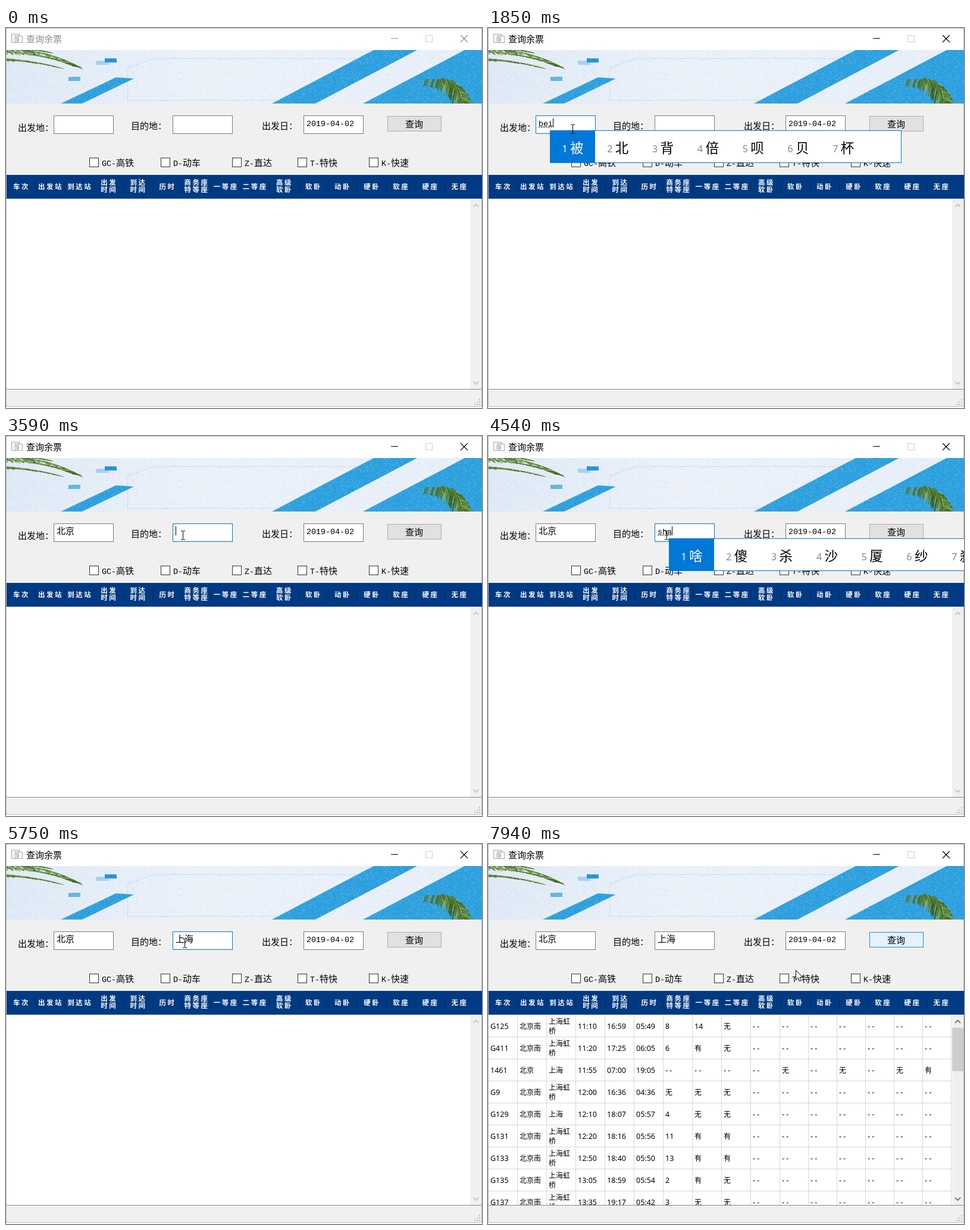
Write an HTML page with a canvas that moves like this. It is 800 by 639 pixels and loops after 8 s.

```html
<!DOCTYPE html>
<html lang="zh-CN">
<head>
<meta charset="utf-8">
<title>查询余票</title>
<style>
html, body { margin: 0; width: 100%; height: 100%; overflow: hidden; background: #fff; }
canvas { display: block; width: 800px; height: 639px; }
</style>
</head>
<body>
<canvas id="stage" width="800" height="639"></canvas>
<script>
const LOOP = 8000;
const BLUE = '#0078d7';
const CJK = '"Noto Sans CJK SC", "Noto Sans CJK", sans-serif';
const SANS = '"Noto Sans", "Open Sans", ' + CJK;
const MONO = '"Liberation Mono", monospace';
const ctx = document.getElementById('stage').getContext('2d');

const HEADERS = ['车次', '出发站', '到达站', '出发|时间', '到达|时间', '历时', '商务座|特等座', '一等座',
  '二等座', '高级|软卧', '软卧', '动卧', '硬卧', '软座', '硬座', '无座'];
const ROWS = [
  'G125 北京南 上海虹桥 11:10 16:59 05:49 8 14 无',
  'G411 北京南 上海虹桥 11:20 17:25 06:05 6 有 无',
  '1461 北京 上海 11:55 07:00 19:05 - - - - 无 - 无 - 无 有',
  'G9 北京南 上海虹桥 12:00 16:36 04:36 无 无 无',
  'G129 北京南 上海 12:10 18:07 05:57 4 无 无',
  'G131 北京南 上海虹桥 12:20 18:16 05:56 11 有 有',
  'G133 北京南 上海虹桥 12:50 18:40 05:50 13 有 有',
  'G135 北京南 上海虹桥 13:05 18:59 05:54 2 有 无',
  'G137 北京南 上海虹桥 13:35 19:17 05:42 3 无 无'
].map(row => row.split(' '));

// Each key press: time, composed text, candidates, optional fuzzy-sound hint.
const FROM_KEYS = [
  [1620, 'b', '不 吧 被 把 比 本 并'],
  [1770, 'be', '被 北 背 倍 呗 贝 杯'],
  [1850, 'bei', '被 北 背 倍 呗 贝 杯'],
  [2020, "bei'j", '北京 背景 北极 背脊 被 北 背'],
  [2100, "bei'ji", '北极 背脊 北级 被 北 背 呗'],
  [2250, "bei'jin", '被禁 北进 北金 背筋 北京(jīng) 被 呗', 'in,ing'],
  [2330, "bei'jing", '北京 背景 被 北 背 呗 贝']
];
const TO_KEYS = [
  [4290, 's', '是 说 三 四 岁 送 所'],
  [4370, 'sh', '是 上 谁 时 事 说 使'],
  [4450, 'sha', '啥 傻 杀 沙 厦 纱 刹'],
  [4610, 'shan', '山 善 闪 删 扇 衫 珊', 'an,ang'],
  [4780, 'shang', '上 商 伤 尚 赏 裳 晌'],
  [5020, "shang'h", '上海 赏花 伤害 商户 商会'],
  [5110, "shang'ha", '上海 伤害 伤寒 商行 上'],
  [5180, "shang'hai", '上海 伤害 上 商 伤']
];
const FIELDS = [
  { x: 80, focus: 765, blur: 3590, keys: FROM_KEYS, commit: 2560, value: '北京', caretOff: [[1300, 1620], [2880, 3410]] },
  { x: 280, focus: 3590, blur: 6760, keys: TO_KEYS, commit: 5260, value: '上海', caretOff: [[4140, 4290], [5750, 6280]] }
];

// Pointer moves: start, end, steps, then from / control / to points.
const MOVES = [
  [230, 990, 11, 200, 670, 165, 240, 142, 169],
  [3050, 3590, 8, 142, 169, 220, 188, 297, 166],
  [3740, 3820, 2, 297, 166, 298, 166, 300, 166],
  [6030, 6760, 11, 300, 166, 470, 398, 673, 161],
  [7860, 7940, 2, 673, 161, 595, 182, 517, 212]
];

function rect(c, x, y, w, h, fill) {
  c.fillStyle = fill;
  c.fillRect(x, y, w, h);
}

function box(x, y, w, h, fill, stroke) {
  rect(ctx, x, y, w, h, stroke);
  rect(ctx, x + 1, y + 1, w - 2, h - 2, fill);
}

function path(c, points, close) {
  c.beginPath();
  for (let i = 0; i < points.length; i += 2) c.lineTo(points[i], points[i + 1]);
  if (close) c.closePath();
}

function polygon(c, points, fill) {
  path(c, points, true);
  c.fillStyle = fill;
  c.fill();
}

function line(c, points, color, width = 1) {
  path(c, points);
  c.strokeStyle = color;
  c.lineWidth = width;
  c.stroke();
}

// Text centred vertically on cy.
function text(str, x, cy, size, color, family = SANS, weight = 400) {
  ctx.font = `${weight} ${size}px ${family}`;
  ctx.fillStyle = color;
  ctx.fillText(str, x, cy + size * 0.38);
}

// Form text: full-width glyphs 15 px apart, half-width ones 8 px.
function formText(str, x, cy, color = '#000') {
  for (const ch of str) {
    const narrow = ch < '\u0100';
    if (narrow) text(ch, x, cy, 13.33, color, MONO);
    else text(ch, x, cy, 15, color, CJK, 300);
    x += narrow ? 8 : 15;
  }
}

function randomizer(seed) {
  return () => (seed = (seed * 16807) % 2147483647) / 2147483647;
}

// Leaflets of a given length and direction along a curved stem.
function frond(c, rnd, x0, y0, cx, cy, x1, y1, length, dx, dy) {
  const greens = ['#47702a', '#6b9440', '#8fb464', '#35581f'];
  const count = 64;
  for (let i = 0; i < count; i++) {
    const u = i / (count - 1), v = 1 - u;
    const x = v * v * x0 + 2 * v * u * cx + u * u * x1;
    const y = v * v * y0 + 2 * v * u * cy + u * u * y1;
    const reach = length * (1 - u * 0.5) * (0.6 + rnd() * 0.5);
    c.strokeStyle = greens[Math.floor(rnd() * 4)];
    c.lineWidth = 0.7 + rnd() * 0.6;
    c.beginPath();
    c.moveTo(x, y);
    c.quadraticCurveTo(x + dx * reach * 0.7, y + dy * reach * 0.3, x + dx * reach, y + dy * reach);
    c.stroke();
  }
}

function makeBanner() {
  const canvas = document.createElement('canvas');
  canvas.width = 800;
  canvas.height = 127;
  const c = canvas.getContext('2d');
  const rnd = randomizer(71);
  const sky = c.createLinearGradient(0, 37, 800, 127);
  sky.addColorStop(0, '#e0eaf6');
  sky.addColorStop(0.4, '#edf2fa');
  sky.addColorStop(1, '#e8f0f9');
  c.beginPath();
  c.rect(1, 37, 799, 90);
  c.clip();
  rect(c, 0, 37, 800, 90, sky);
  line(c, [455, 121.5, 204.5, 121.5, 204.5, 66.5, 250, 51.5, 590, 51.5], '#c9dced');
  const blue = '#2a9fde';
  polygon(c, [92, 127, 185, 83, 215, 85, 128, 127], blue);
  polygon(c, [447, 127, 618, 37, 691, 37, 520, 127], blue);
  polygon(c, [600, 127, 771, 37, 800, 37, 800, 127], blue);
  rect(c, 151, 55, 21, 7, '#a9d0ec');
  rect(c, 166, 51, 20, 7, '#2095d5');
  rect(c, 105, 82, 20, 7, '#60b5e2');
  for (let i = 0; i < 22000; i++) {
    const shade = rnd() < 0.5 ? 'rgba(255,255,255,.2)' : 'rgba(110,160,215,.12)';
    rect(c, Math.floor(rnd() * 800), 37 + Math.floor(rnd() * 90), 1, 1, shade);
  }
  frond(c, rnd, -30, 32, 60, 32, 116, 64, 34, 0.9, 0.4);
  frond(c, rnd, -30, 36, 60, 42, 112, 64, 32, 0.95, 0.2);
  frond(c, rnd, -30, 50, 30, 52, 84, 66, 30, 0.95, 0.2);
  frond(c, rnd, -20, 30, 30, 32, 66, 40, 30, 0.95, 0.2);
  frond(c, rnd, 776, 127, 768, 84, 704, 86, 30, -0.25, 0.8);
  frond(c, rnd, 770, 127, 762, 84, 726, 86, 38, -0.3, 0.9);
  frond(c, rnd, 768, 122, 758, 86, 730, 84, 32, 0.35, 0.8);
  frond(c, rnd, 770, 127, 764, 98, 748, 88, 24, 0.75, 0.5);
  return canvas;
}
const banner = makeBanner();

function drawWindow(active) {
  rect(ctx, 0, 0, 800, 639, '#fff');
  box(0, 0, 800, 637, '#f0f0f0', '#b9b9b9');
  rect(ctx, 1, 1, 798, 36, '#fff');
  box(9, 10, 14, 15, '#f4f6f8', '#a3abb2');
  box(15, 13, 13, 12, '#fff', '#98a2aa');
  rect(ctx, 17, 15, 5, 8, '#b9cbd8');
  const ink = active ? '#000' : '#8c8c8c';
  formText('查询余票', 34, 18.5, ink);
  rect(ctx, 647, 17, 12, 1, ink);
  box(705, 12, 12, 12, '#fff', '#cfcfcf');
  line(ctx, [764, 12, 776, 24], ink, 1.1);
  line(ctx, [776, 12, 764, 24], ink, 1.1);
  ctx.drawImage(banner, 0, 0);
}

function drawForm(t) {
  formText('出发地：', 20, 167);
  formText('目的地：', 210, 164);
  formText('出发日：', 430, 164);
  box(500, 147, 101, 31, '#fff', '#7a7a7a');
  formText('2019-04-02', 505, 160);

  const [mx, my] = pointer(t);
  const over = mx >= 641 && mx < 732 && my >= 148 && my < 174;
  let skin = ['#e1e1e1', '#adadad'];
  if (t >= 6760 && t < 7540) skin = ['#d5e9f7', '#1a67b0'];
  else if (over || t >= 7540) skin = ['#e5f1fb', '#2a86d4'];
  box(641, 148, 91, 26, ...skin);
  formText('查询', 671, 161);

  [[140, 'GC-高铁'], [260, 'D-动车'], [380, 'Z-直达'], [490, 'T-特快'], [610, 'K-快速']].forEach(([x, label]) => {
    box(x, 218, 16, 16, '#fff', '#333');
    formText(label, x + 21, 226.5);
  });
}

function composing(field, t) {
  return t < field.commit ? field.keys.filter(key => key[0] <= t).pop() : undefined;
}

function drawField(field, t) {
  const focused = t >= field.focus && t < field.blur;
  const key = composing(field, t);
  const str = key ? key[1] : t >= field.commit ? field.value : '';
  const left = field.x + 5;
  box(field.x, 147, 101, 31, '#fff', focused ? BLUE : '#7a7a7a');
  formText(str, left, key ? 160 : 159.5);
  const width = str.length * (key ? 8 : 15);
  if (key) for (let x = 0; x < width; x += 4) rect(ctx, left + x, 166, 3, 1, '#000');
  const hidden = field.caretOff.some(([from, to]) => t >= from && t < to);
  if (focused && !hidden) rect(ctx, left + width, 152, 1, 15, '#000');
}

function drawPopup(field, t) {
  const key = composing(field, t);
  if (!key) return;
  const [, str, list, hint] = key;
  const left = field.x + str.length * 8;
  const items = list.split(' ').map(word => {
    ctx.font = `400 22.5px ${SANS}`;
    return { word, width: ctx.measureText(word).width + 53.3 };
  });
  const width = Math.round(items.reduce((sum, item) => sum + item.width, 0) + 60);
  if (hint) {
    box(left, 226, width, 34, '#fff', BLUE);
    text(`点击前往设置页面开启模糊音<${hint}>。`, left + 10, 243.5, 17, '#777');
  }
  box(left, 172, width, 55, '#fff', BLUE);
  let x = left;
  items.forEach(({ word, width: w }, i) => {
    if (!i) rect(ctx, x, 172, Math.ceil(w), 55, BLUE);
    text(String(i + 1), x + 20.5, 203, 16, i ? '#888' : '#fff');
    text(word, x + 34, 201.5, 22.5, i ? '#000' : '#fff');
    x += w;
  });
}

function drawHeader() {
  rect(ctx, 1, 247, 799, 40, '#003a82');
  ctx.textAlign = 'center';
  ctx.letterSpacing = '2.6px';
  HEADERS.forEach((label, i) => {
    const lines = label.split('|');
    lines.forEach((part, n) => {
      const cy = lines.length > 1 ? 260 + n * 12 : 266.5;
      text(part, 26 + 49.1 * i, cy, 11.4, '#fff', CJK, 700);
    });
    if (i) rect(ctx, Math.round(49.15 * i), 257, 1, 20, '#002a63');
  });
  ctx.textAlign = 'left';
  ctx.letterSpacing = '0px';
}

const columnX = i => 49 * i - Math.max(0, i - 10);

function drawTable(filled) {
  rect(ctx, 1, 287, 798, 320, '#fff');
  rect(ctx, 780, 288, 19, 319, '#f0f0f0');
  if (filled) {
    ctx.save();
    ctx.beginPath();
    ctx.rect(1, 288, 779, 319);
    ctx.clip();
    for (let i = 1; i <= 16; i++) rect(ctx, columnX(i), 288, 1, 319, '#d8d8d8');
    ROWS.forEach((row, r) => {
      const cy = 306.5 + 37 * r;
      rect(ctx, 1, 324 + 37 * r, 778, 1, '#d8d8d8');
      for (let i = 0; i < 16; i++) {
        const value = row[i] || '-', x = columnX(i) + 4;
        if (value.length > 3 && value > '\u4e00') {
          text(value.slice(0, 3), x, cy - 8.5, 12, '#000');
          text(value.slice(3), x, cy + 8, 12, '#000');
        } else {
          text(value === '-' ? '- -' : value, x, cy, value > '\u4e00' ? 12 : 12.5, '#000');
        }
      }
    });
    ctx.restore();
    rect(ctx, 780, 309, 19, 73, '#cdcdcd');
  }
  const arrow = filled ? '#606060' : '#bfbfbf';
  line(ctx, [785, 301, 789.5, 296.5, 794, 301], arrow, 1.6);
  line(ctx, [785, 594.5, 789.5, 599, 794, 594.5], arrow, 1.6);
  rect(ctx, 1, 607, 798, 1, '#8a8a8a');
  for (let r = 0; r < 3; r++)
    for (let n = 0; n <= r; n++) rect(ctx, 795 - n * 4, 624 + r * 4, 2, 2, '#bcbcbc');
}

function pointer(t) {
  const move = MOVES.filter(m => m[0] <= t).pop();
  if (!move) return [-50, -50];
  const [start, end, steps, x0, y0, cx, cy, x1, y1] = move;
  const step = Math.min(steps, Math.floor((t - start) / (end - start) * (steps - 1) + 0.01) + 1);
  const s = step / steps, u = s * s * (3 - 2 * s), v = 1 - u;
  const mix = (a, b, c) => Math.round(v * v * a + 2 * v * u * b + u * u * c);
  return [mix(x0, cx, x1), mix(y0, cy, y1)];
}

function drawPointer(t) {
  const [x, y] = pointer(t);
  const overText = y >= 147 && y < 178 && [80, 280, 500].some(left => x >= left && x < left + 101);
  if (overText) {
    rect(ctx, x, y - 6, 1, 14, '#000');
    for (const dy of [-7, 8]) {
      rect(ctx, x - 3, y + dy, 3, 1, '#000');
      rect(ctx, x + 1, y + dy, 3, 1, '#000');
    }
    return;
  }
  ctx.save();
  ctx.translate(x + 0.5, y + 0.5);
  polygon(ctx, [0, 0, 0, 16, 3.7, 12.5, 6.3, 18.3, 9, 17, 6.5, 11.5, 11.5, 11.5], '#fff');
  ctx.strokeStyle = '#000';
  ctx.lineWidth = 1;
  ctx.stroke();
  ctx.restore();
}

function draw(now) {
  const t = now % LOOP;
  drawWindow(t >= 765);
  drawForm(t);
  FIELDS.forEach(field => drawField(field, t));
  drawHeader();
  drawTable(t >= 7540);
  FIELDS.forEach(field => drawPopup(field, t));
  drawPointer(t);
}

let origin;
function tick(now) {
  origin ??= now;
  draw(now - origin);
  requestAnimationFrame(tick);
}
draw(0);
requestAnimationFrame(tick);
</script>
</body>
</html>
```
